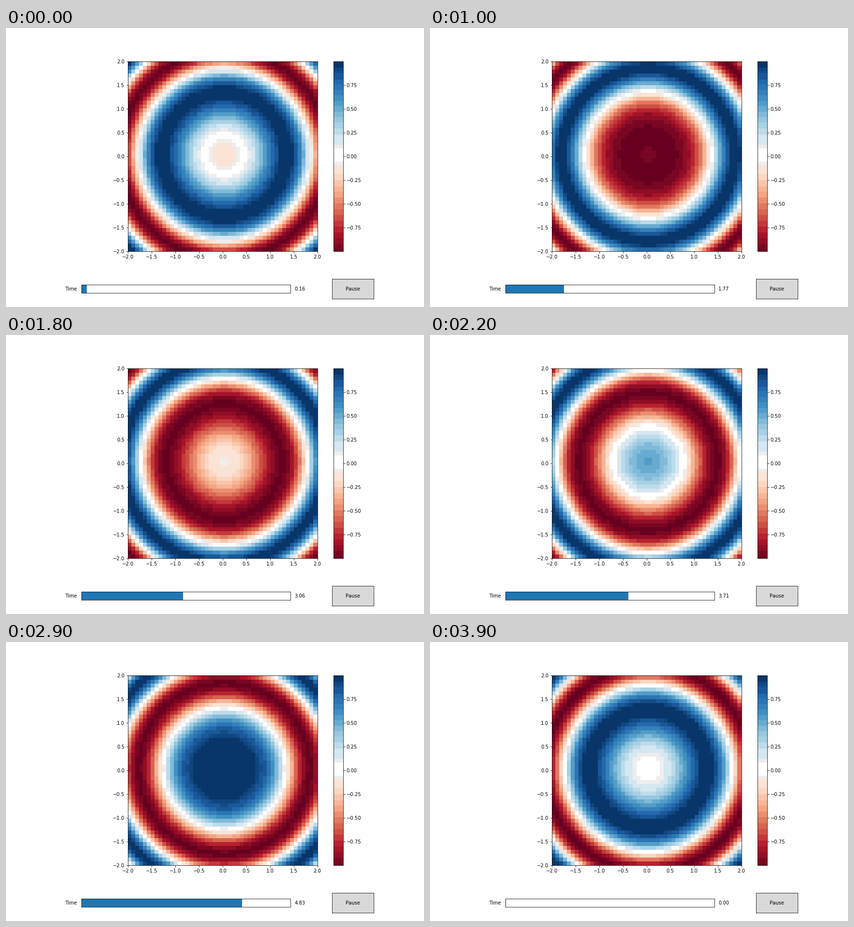
Write a matplotlib script that moves like this. It is 864 px wide and 576 px high and loops after 4000 ms.

```python
import numpy as np
import matplotlib.pyplot as plt
from matplotlib.animation import FuncAnimation
from matplotlib.colors import ListedColormap

W, H, DPI = 864, 576, 72
FRAMES, INTERVAL = 40, 100
WHITE, PALE = (1, 1, 1, 1), (0.933, 0.933, 0.933, 1)


def banded_cmap():
    """RdBu in flat bands, with a white core edged in pale grey."""
    red = [-1, -0.985, -0.92, *np.linspace(-0.86, -0.25, 11), -0.18, -0.09]
    blue = [0.125, 0.23, *np.linspace(0.3, 0.76, 9), 0.81, 0.882, 0.905, 0.938, 1]
    edges = np.array([*red, -0.055, 0.083, *blue])
    mids = (edges[:-1] + edges[1:]) / 2
    colors = plt.get_cmap("RdBu")((mids + 1) / 2)
    core = len(red)
    colors[core - 1:core + 2] = PALE, WHITE, PALE
    levels = (np.arange(512) + 0.5) / 256 - 1
    return ListedColormap(colors[np.searchsorted(edges, levels) - 1])


def panel(left, bottom, width, height, color="white"):
    ax = fig.add_axes([left, bottom, width, height], facecolor=color)
    ax.set(xticks=[], yticks=[])
    return ax


# Unsnapped cells and whole-pixel kerning give the classic rendering
plt.rcParams.update({"font.family": "DejaVu Sans", "font.size": 10,
                     "pcolormesh.snap": False, "text.kerning_factor": 6})
fig, ax = plt.subplots(figsize=(W / DPI, H / DPI), dpi=DPI, facecolor="white")

# Wave field
x = np.linspace(-2, 2, 50)
X, Y = np.meshgrid(x, x)
R2 = (X**2 + Y**2)[:-1, :-1]
times = np.linspace(0, 2 * np.pi, FRAMES)

mesh = ax.pcolormesh(X, Y, np.sin(R2), cmap=banded_cmap(), vmin=-1, vmax=1)
ticks = np.arange(-2, 2.1, 0.5)
ax.set(xlim=(-2, 2), ylim=(-2, 2), xticks=ticks, yticks=ticks, aspect="equal")
fig.colorbar(mesh, ax=ax, ticks=np.arange(-0.75, 0.8, 0.25))
fig.subplots_adjust(bottom=0.2)

# Time slider
slider = panel(0.18, 0.05, 0.5, 0.03)
slider.set(xlim=(0, times[-1]), ylim=(0, 1))
slider.axvline(0, color="red", lw=1)
bar = plt.Rectangle((0, 0), 0, 1, fc="#1f77b4", ec="none")
slider.add_patch(bar)
slider.text(-0.02, 0.5, "Time", transform=slider.transAxes,
            ha="right", va="center")
readout = slider.text(1.02, 0.5, "", transform=slider.transAxes,
                      ha="left", va="center")

# Button
button = panel(0.78, 0.03, 0.1, 0.07, "0.85")
button.text(0.5, 0.5, "Pause", transform=button.transAxes,
            ha="center", va="center")


def update(i):
    t = times[(i + 1) % FRAMES]
    mesh.set_array(np.sin(R2 - t))
    bar.set_width(t)
    readout.set_text(f"{t:.2f}")
    return mesh, bar, readout


anim = FuncAnimation(fig, update, frames=FRAMES, interval=INTERVAL,
                     repeat=True, repeat_delay=0)
plt.show()
```
